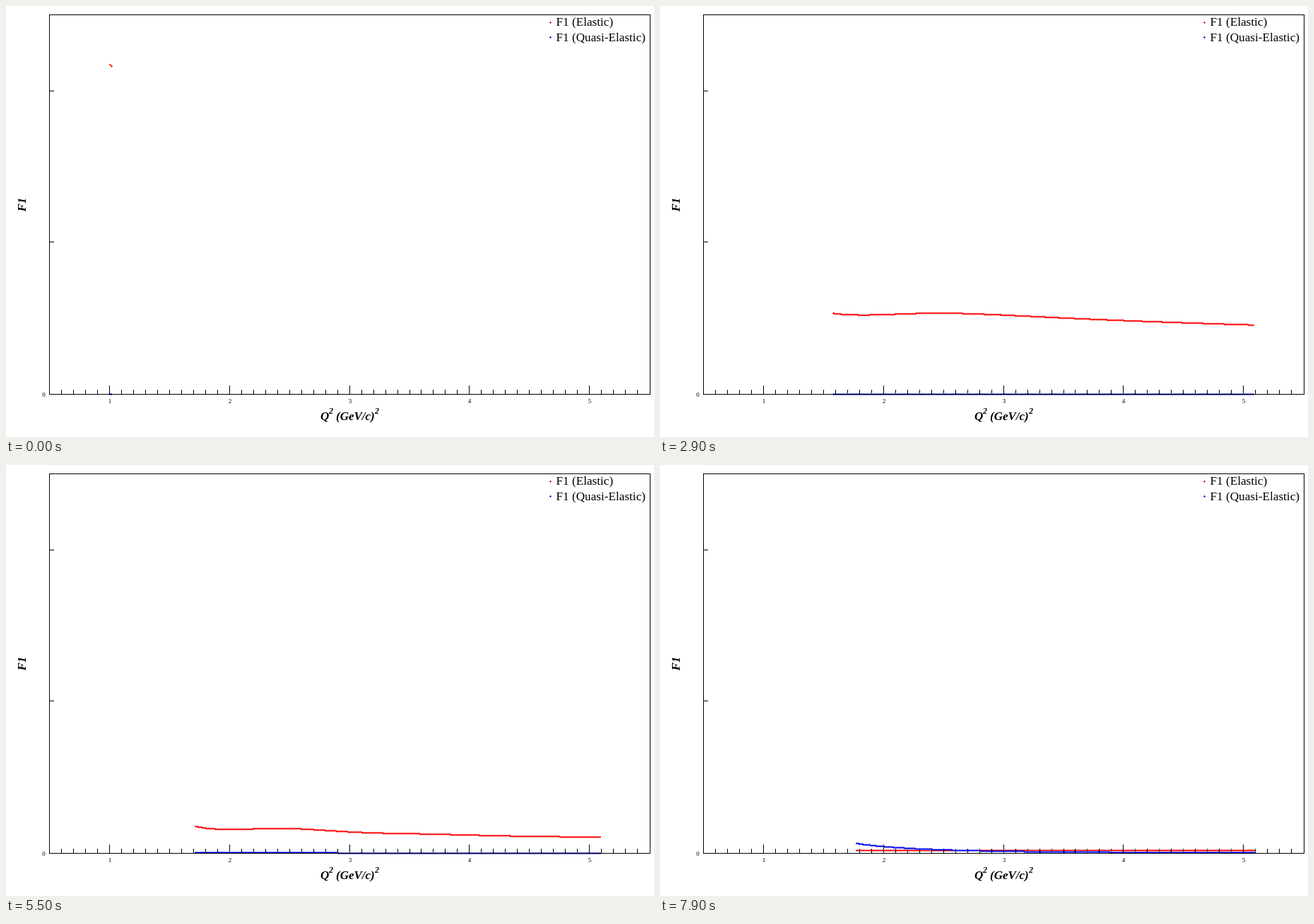
Write an HTML page that moves like this. It is 917x611 px and loops after 8000 ms.

```html
<!DOCTYPE html>
<html lang="en">
<head>
<meta charset="utf-8">
<title>F1 against Q²</title>
<style>
  html, body { margin: 0; width: 100%; height: 100%; overflow: hidden; background: #fff; }
  svg { display: block; width: 917px; height: 611px; }
  text { font-family: "Liberation Serif", "Times New Roman", serif; }
  .legend { font-size: 17.2px; }
  .title { font-size: 17px; font-weight: bold; font-style: italic; }
  .sup { font-size: 12px; }
  .tick { font-size: 9px; text-anchor: middle; }
  path { shape-rendering: crispEdges; }
</style>
</head>
<body>
<svg viewBox="0 0 917 611">
  <path id="elastic" fill="#f00"/>
  <path id="quasi" fill="#00f"/>
  <path id="axes" fill="none" stroke="#000"/>
  <g id="labels"></g>
  <path id="elasticKey" fill="#f00"/>
  <path id="quasiKey" fill="#00f"/>
  <g class="legend">
    <text x="778.5" y="28">F1 (Elastic)</text>
    <text x="778.5" y="49.5">F1 (Quasi-Elastic)</text>
  </g>
  <g class="title">
    <text x="445" y="587">Q</text>
    <text x="457" y="578" class="sup">2</text>
    <text x="467" y="587">(GeV/c)</text>
    <text x="522" y="578" class="sup">2</text>
    <text transform="translate(28 291.5) rotate(-90)">F1</text>
  </g>
</svg>
<script>
const STEP_MS = 100, STEPS = 80;
const LEFT = 61.6, BASE = 549.6, MINOR = 16.98;
const byId = id => document.getElementById(id);
const toPx = q2 => LEFT + (q2 - 0.5) * MINOR * 10;
const toQ2 = px => (px - LEFT) / MINOR / 10 + 0.5;
const bell = (value, centre, width) => Math.exp(-(((value - centre) / width) ** 2));

// Three-pixel plus sign
const marker = (x, y) => `M${x} ${y - 1}h1v1h1v1h-1v1h-1v-1h-1v-1h1z`;

// Peaks stay at fixed w = W² − M² and come and go with x
const resonances = [
  { w: 0.6, width: 0.25, x: 0.68, spread: 0.155, gain: 1.3 },
  { w: 1.34, width: 0.3, x: 0.62, spread: 0.2, gain: 0.27 },
  { w: 1.92, width: 0.36, x: 0.55, spread: 0.1, gain: 0.235 }
];

function elasticHeight(x, q2, w) {
  const smooth = 1012 * x ** 0.3 * (1 - x) ** 1.1 * Math.exp(-3.88 * x) * (5 / q2) ** 0.26;
  const dip = 0.145 * bell(w * x, 0.95, 0.45) * Math.exp(-(((x - 0.325) / 0.15) ** 4));
  return smooth * resonances.reduce(
    (sum, r) => sum + r.gain * bell(w, r.w, r.width) * bell(x, r.x, r.spread), 1 - dip);
}

function quasiHeight(x, q2) {
  return (0.0014 * Math.exp(9 * x) + 28 * bell(x, 1, 0.106)) * (1.773 / q2) ** 3.2;
}

function drawStep(step) {
  // Fixed beam limits Q² from below, the W cut from above
  const x = 0.0985 + 0.01 * step;
  const odds = x / (1 - x);
  const first = Math.round(toPx(1 / (0.5098 + 0.0478 / x)));
  const last = toPx(Math.min(5.09, 9.38 * odds));

  let red = "", blue = "";
  for (let px = first; px <= last; px += 2) {
    const q2 = toQ2(px);
    red += marker(px, Math.round(BASE - elasticHeight(x, q2, q2 / odds)));
    blue += marker(px, Math.round(BASE - quasiHeight(x, q2)));
  }
  byId("elastic").setAttribute("d", red);
  byId("quasi").setAttribute("d", blue);
}

function drawAxes() {
  let d = "M61.5 12.5H911.5V550.5H61.5ZM61.5 334.5h6.5M61.5 120.5h6.5";
  let labels = '<text class="tick" x="53.5" y="553.5">0</text>';
  for (let k = 1; k < 50; k++) {
    const px = Math.floor(LEFT + MINOR * k) + 0.5, major = k % 10 === 5;
    d += `M${px} 550.5v${major ? -12.5 : -6.5}`;
    if (major) labels += `<text class="tick" x="${px + 0.5}" y="563">${(k + 5) / 10}</text>`;
  }
  byId("axes").setAttribute("d", d);
  byId("labels").innerHTML = labels;
  byId("elasticKey").setAttribute("d", marker(770, 23));
  byId("quasiKey").setAttribute("d", marker(770, 44));
}

let start = null, shown = -1;
function tick(now) {
  if (start === null) start = now;
  const step = Math.floor((now - start) / STEP_MS) % STEPS;
  if (step !== shown) drawStep(shown = step);
  requestAnimationFrame(tick);
}

drawAxes();
drawStep(0);
requestAnimationFrame(tick);
</script>
</body>
</html>
```
